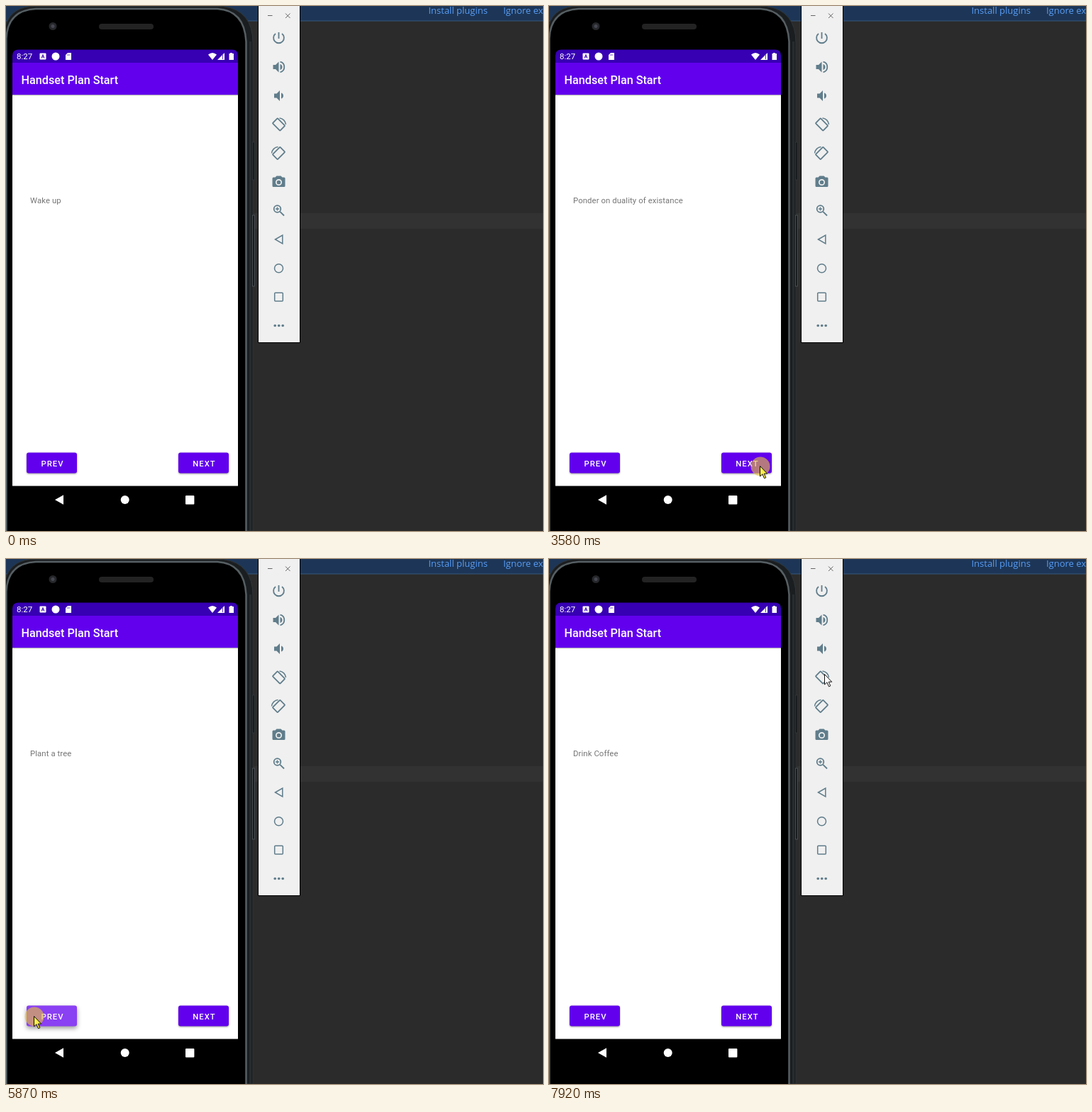
Animation of 757x740 px, one loop 8000 ms. Source, as an HTML page:

```html
<!DOCTYPE html>
<html lang="en">
<head>
<meta charset="utf-8">
<title>Todo app in an emulator</title>
<style>
  html, body { margin: 0; width: 100%; height: 100%; overflow: hidden; background: #2b2b2b; }
  svg { display: block; width: 757px; height: 740px; }
  text { font-family: Roboto, sans-serif; fill: #fff; }
  .link { font: 13px "Open Sans", sans-serif; fill: #589df6; }
  .title { font-size: 16.2px; font-weight: 500; }
  .task { font-size: 11.34px; letter-spacing: .008em; fill: #757575; }
  .label { font-size: 11.34px; font-weight: 500; letter-spacing: .089em; text-anchor: middle; }
  .tools { fill: #607d8b; stroke: none; }
  .line { fill: none; stroke: #607d8b; stroke-width: 1.8; }
  .thin { stroke-width: 1.5; }
</style>
</head>
<body>
<svg viewBox="0 0 757 740">
  <defs>
    <path id="speaker" d="M-8-3h3.5l4.5-4.5v15L-4.500 3H-8z"/>
    <g id="rotate">
      <rect class="line" x="-5" y="-7.500" width="10" height="15" rx="1" transform="rotate(-45)"/>
      <path class="line thin" d="M1-9a10 10 0 0 1 9 9"/>
    </g>
  </defs>

  <!-- Editor behind the emulator -->
  <rect width="757" height="740" fill="#2b2b2b"/>
  <rect width="757" height="21" fill="#1d3657"/>
  <rect y="20.500" width="757" height="1" fill="#36577d"/>
  <text class="link" x="595.500" y="11">Install plugins</text>
  <text class="link" x="701" y="11">Ignore ex</text>
  <rect x="349" y="292" width="408" height="22" fill="#323232"/>

  <!-- Phone body -->
  <path d="M-2 740V34Q3 4 34 .5H306Q348 6 348 52V740z" fill="#1b1e20" stroke="#2f3538"/>
  <path d="M.5 740V46Q2 6 42 4H298Q336 6 338.500 50V740" fill="#000" stroke="#565f63" stroke-width="2.500"/>
  <path d="M344.500 740V50" stroke="#272c2e" stroke-width="3"/>
  <rect x="347.500" y="192" width="3" height="53" fill="#191c1e" stroke="#34393b" stroke-width=".7"/>
  <rect x="347.500" y="295" width="3" height="100" fill="#191c1e" stroke="#596064" stroke-width=".7"/>
  <circle cx="66" cy="28.500" r="5.500" fill="#25272a"/>
  <circle cx="66" cy="28.500" r="2.500" fill="#454650"/>
  <rect x="131" y="25" width="77" height="8" rx="4" fill="#232323"/>

  <!-- App screen -->
  <rect x="9" y="100" width="318" height="576.500" fill="#fff"/>
  <path d="M9 80V70q0-8.500 8.500-8.500H318.500q8.500 0 8.500 8.500v10z" fill="#3700b3"/>
  <rect x="9" y="80" width="318" height="45" fill="#6200ee"/>
  <rect x="9" y="125" width="318" height="1" fill="#b8b4c0"/>
  <rect x="9" y="126" width="318" height="1" fill="#efefef"/>
  <text x="15" y="75" font-size="11.500">8:27</text>
  <g fill="#fff">
    <rect x="47.500" y="66.500" width="9" height="9" rx="1"/>
    <path d="M50 73.500l2-5 2 5m-3.400-1.600h2.800" fill="none" stroke="#3700b3"/>
    <circle cx="70" cy="71" r="5.500"/>
    <path d="M87 66h5v10h-8v-7z"/>
    <path d="M87 68v2m2-2v2" stroke="#3700b3" stroke-width=".7"/>
    <path d="M285 68.500q6-5 12 0L291 76z"/>
    <path d="M308 66v10h-10z"/>
    <path d="M305.500 69v6" stroke="#3700b3" stroke-width=".8"/>
    <path d="M316 66h3v1h2v9h-6.500v-9h1.500z"/>
    <path d="M69 696l12-6.700v13.400z"/>
    <circle cx="167.700" cy="696" r="6"/>
    <rect x="253" y="690" width="12.400" height="12.400" rx="1"/>
  </g>
  <text class="title" x="21.500" y="109.500">Handset Plan Start</text>
  <text class="task" id="task" x="34" y="278"></text>
  <g id="buttons"></g>

  <!-- Emulator toolbar -->
  <rect x="355.500" y="-1" width="59" height="475.500" fill="#f0f0f0" stroke="#000"/>
  <path d="M369 13.500h6.500M394 10.500l6.500 6.500m0-6.500l-6.500 6.500" fill="none" stroke="#666"/>
  <g class="tools">
    <path class="line" transform="translate(384.500 45)" d="M0-8V1M-4.500-6a7.400 7.400 0 1 0 9 0"/>
    <g transform="translate(384.500 86)">
      <use href="#speaker"/>
      <path d="M2-4a4.200 4.200 0 0 1 0 8z"/>
      <path class="line" d="M2-7.300a7.500 7.500 0 0 1 0 14.600"/>
    </g>
    <g transform="translate(386 126.500)">
      <use href="#speaker"/>
      <path d="M2-4a4.200 4.200 0 0 1 0 8z"/>
    </g>
    <use href="#rotate" transform="translate(384.500 167)"/>
    <use href="#rotate" transform="translate(384.500 207.500) scale(-1 1)"/>
    <g transform="translate(384.500 247.500)">
      <path d="M-3-8h6l2 2h2.500q1.500 0 1.500 1.500v10.500q0 1.500-1.500 1.500h-15q-1.500 0-1.500-1.500v-10.500q0-1.500 1.500-1.500h2.500z"/>
      <circle r="3.700" cy="1" fill="none" stroke="#f0f0f0" stroke-width="1.700"/>
    </g>
    <g transform="translate(384.500 288)">
      <circle class="line" cx="-2" cy="-2" r="4.800"/>
      <path class="line" d="M1.800 1.800L7.500 7.500"/>
      <path class="line thin" d="M-4.500-2h5M-2-4.500v5"/>
    </g>
    <path class="line thin" d="M379.500 329l10.300-6v12z"/>
    <circle class="line thin" cx="384.500" cy="369.700" r="6"/>
    <rect class="line thin" x="378.700" y="404.300" width="11.600" height="11.600" rx="1"/>
    <circle cx="379.200" cy="450.500" r="1.800"/>
    <circle cx="384.700" cy="450.500" r="1.800"/>
    <circle cx="390.200" cy="450.500" r="1.800"/>
  </g>

  <g id="cursor">
    <circle id="halo" cx="0" cy="1" r="13.500" fill="#e4be40" opacity=".63"/>
    <path id="arrow" d="M-.5.5V15l3.400-3.200 2.600 6 2.300-1-2.600-5.600h4.500z" stroke="#111" stroke-width="1"/>
  </g>
</svg>
<script>
const LOOP = 8000, TEXT_DELAY = 200, HALO_TIME = 250;
const byId = id => document.getElementById(id);
const clamp = v => Math.max(0, Math.min(1, v));

const tasks = ["Wake up", "Drink Coffee", "Count clouds and breathe slowly",
  "Plant a tree", "Ponder on duality of existance", "Go to sleep"];
const nextPresses = [2200, 2540, 2880, 3220, 3560];
const prevPresses = [5210, 5640, 6080, 6480];

// time, x, y of the pointer tip
const path = [
  [1030, 301, 700], [1350, 300, 676], [1800, 297, 650], [1880, 298, 648],
  [4130, 298, 648], [4420, 170, 671], [4680, 22, 669], [4780, 9, 660], [4910, 40, 644],
  [6930, 40, 644], [7010, 98, 513], [7400, 250, 290], [7780, 377, 169], [7920, 389, 162]
];

function makeButton(name, x) {
  byId("buttons").insertAdjacentHTML("beforeend", `
    <g><rect x="${x}" y="629.5" width="71" height="29" rx="3" fill="#6200ee"/>
    <rect x="${x}" y="629.5" width="71" height="29" rx="3" fill="#fff"/>
    <text class="label" x="${x + 36.5}" y="648.5">${name}</text></g>`);
  const [base, light] = byId("buttons").lastElementChild.children;
  return { base, light };
}
const prev = makeButton("PREV", 29), next = makeButton("NEXT", 243);

function pointerAt(t) {
  const i = path.findIndex(key => key[0] > t);
  if (i < 0) return path[path.length - 1].slice(1);
  if (i === 0) return null;
  const [t0, x0, y0] = path[i - 1], [t1, x1, y1] = path[i];
  const k = (t - t0) / (t1 - t0);
  return [x0 + (x1 - x0) * k, y0 + (y1 - y0) * k];
}

// Time since the latest press, or Infinity before the first one
function sincePress(presses, t) {
  const past = presses.filter(p => p <= t);
  return past.length ? t - past[past.length - 1] : Infinity;
}

function drawButton(button, age) {
  const glow = clamp((age - 50) / 70) * clamp((340 - age) / 100);
  button.light.setAttribute("opacity", .25 * glow);
  button.base.style.filter =
    `drop-shadow(0 ${1.2 + 2.3 * glow}px ${1 + 2 * glow}px #0006)`;
}

function draw(t) {
  const clicks = list => list.filter(p => p + TEXT_DELAY <= t).length;
  const task = tasks[clicks(nextPresses) - clicks(prevPresses)];
  if (byId("task").textContent !== task) byId("task").textContent = task;

  const nextAge = sincePress(nextPresses, t), prevAge = sincePress(prevPresses, t);
  drawButton(next, nextAge);
  drawButton(prev, prevAge);

  const pressed = Math.min(nextAge, prevAge) < HALO_TIME;
  byId("halo").style.display = pressed ? "" : "none";
  byId("arrow").setAttribute("fill", pressed ? "#fff04d" : "#fff");

  const tip = pointerAt(t);
  byId("cursor").style.display = tip ? "" : "none";
  if (tip) byId("cursor").setAttribute("transform", `translate(${tip.map(Math.round)})`);
}

const start = performance.now();
function frame() {
  draw((performance.now() - start) % LOOP);
  requestAnimationFrame(frame);
}
frame();
</script>
</body>
</html>
```
